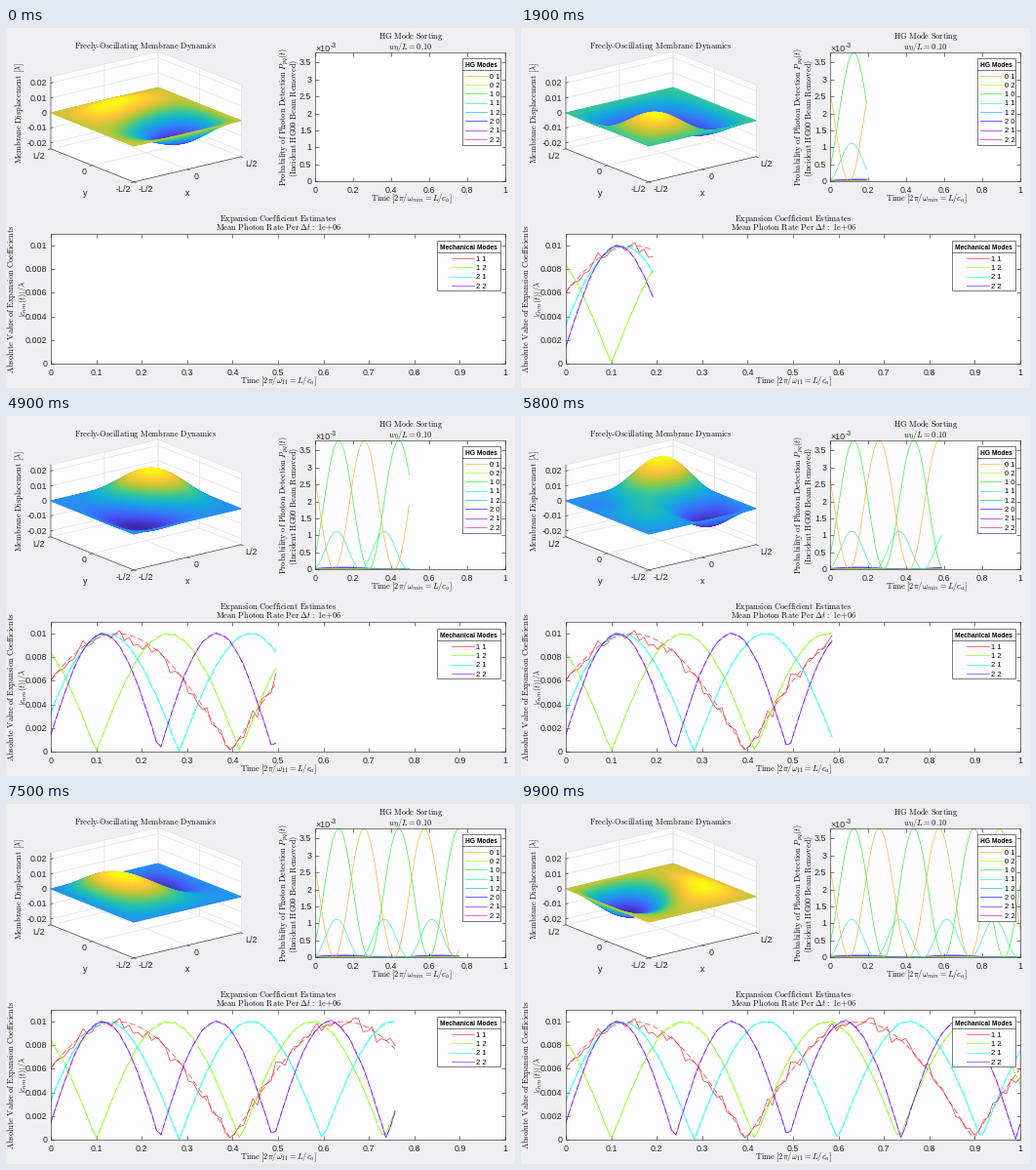
Write a matplotlib script that moves like this. It is 522x369 px and loops after 10000 ms.

```python
import numpy as np
import matplotlib.pyplot as plt
from matplotlib.animation import FuncAnimation
from matplotlib.colors import LinearSegmentedColormap

W, H, DPI = 522, 369, 100
STEPS = 100
PT = 72 / DPI
INK, GRID = "#262626", "#dfdee1"
PAPER, PANEL = "#efeef0", "#fdfcfe"
TICK, TEX, KEY = 8.9, 8.4, 6.7
THIN = .6 * PT

plt.rcParams["font.family"] = "Liberation Sans"
plt.rcParams["mathtext.fontset"] = "cm"

PARULA = LinearSegmentedColormap.from_list("parula", [
    (.2422, .1504, .6603), (.2810, .3228, .9579), (.1786, .5289, .9682),
    (.0689, .6948, .8394), (.2161, .7843, .5923), (.6720, .7793, .2227),
    (.9970, .7659, .2199), (.9769, .9839, .0805)])

HG_COLORS = {
    "0 1": (.95, .68, .1), "0 2": (.667, 1, 0), "1 0": (.1, .95, .15),
    "1 1": (.1, .95, .65), "1 2": (0, .667, 1), "2 0": (0, 0, 1),
    "2 1": (.5, 0, .95), "2 2": (1, 0, .667)}
MECH_COLORS = {"1 1": (.9, .12, .12), "1 2": (.5, 1, 0),
               "2 1": (0, 1, 1), "2 2": (.45, .05, .95)}

# Mode amplitudes of the free oscillation
time = np.linspace(0, 1, STEPS)
w12 = 2 * np.pi * np.sqrt(2.5)
coef = {
    "1 1": -np.cos(2 * np.pi * (time - .147)),
    "1 2": np.sin(w12 * (time - .1)),
    "2 1": -np.sin(w12 * (time - .282)),
    "2 2": -np.sin(4 * np.pi * (time - .239))}

rng = np.random.default_rng(7)
estimate = {}
for key, c in coef.items():
    spread = .04 if key == "1 1" else .007
    noise = rng.normal(0, spread, STEPS).clip(-2 * spread, 2 * spread)
    estimate[key] = np.abs(np.abs(c) + noise) * .01

power = {k: c ** 2 for k, c in coef.items()}
detect = {
    "0 1": 3.8 * power["1 2"], "0 2": .01 * power["1 1"],
    "1 0": 3.8 * power["2 1"], "1 1": 1.12 * power["2 2"],
    "1 2": .01 * power["2 1"], "2 0": .04 * power["1 1"],
    "2 1": .06 * power["1 1"], "2 2": .01 * power["2 2"]}

fig = plt.figure(figsize=(W / DPI, H / DPI), dpi=DPI, facecolor=PAPER)


def panel(x0, y0, x1, y1, ymax, xticks, yticks):
    ax = fig.add_axes([x0 / W, 1 - y1 / H, (x1 - x0) / W, (y1 - y0) / H],
                      facecolor=PANEL)
    ax.set(xlim=(0, 1), ylim=(0, ymax), xticks=xticks, yticks=yticks)
    ax.tick_params(direction="in", top=True, right=True, length=2.6,
                   width=THIN, color=INK, labelbottom=False, labelleft=False)
    for spine in ax.spines.values():
        spine.set(linewidth=THIN, color=INK)
    for v in xticks:
        text(x0 + v * (x1 - x0), y1 + 12, f"{v:.1g}")
    for v in yticks:
        text(x0 - 3.5, y1 - v / ymax * (y1 - y0) + 3, f"{v:g}", ha="right")
    return ax


stage = fig.add_axes([0, 0, 1, 1], zorder=5)
stage.set(xlim=(0, W), ylim=(H, 0))
stage.axis("off")


def text(x, y, s, size=TICK, ha="center", **kw):
    stage.text(x, y, s, fontsize=size * PT, ha=ha, va="baseline",
               color=kw.pop("color", INK), zorder=8, **kw)


def tex(x, y, s, upright=False):
    text(x, y, s, TEX, color="#111111", rotation=90 if upright else 0,
         rotation_mode="anchor")


def rm(s):
    """Upright words; text mode keeps hyphens and plus signs tight."""
    return "$" + r"\ ".join(r"\text{%s}" % word for word in s.split()) + "$"


def stroke(pts, color=INK, width=.6, z=1):
    xs, ys = zip(*pts)
    stage.plot(xs, ys, color=color, lw=width * PT, zorder=z)


def legend(x0, y0, x1, y1, title, colors, line_x, first):
    stage.add_patch(plt.Rectangle((x0, y0), x1 - x0, y1 - y0, fc=PANEL,
                                  ec=INK, lw=THIN, zorder=6))
    text((x0 + x1) / 2, y0 + 9, title, KEY, weight="bold", color="black")
    stroke([(x0, y0 + 12), (x1, y0 + 12)], z=7)
    for i, (name, color) in enumerate(colors.items()):
        y = first + 9.3 * i
        stroke([(line_x, y), (line_x + 22.5, y)], color, z=7)
        text(line_x + 25, y + 2.8, name, 7.6, ha="left", color="black")


def project(x, y, z):
    """Unit square plus height to stage pixels."""
    return 131 + 110 * x - 85 * y, 121 - 26 * x - 34 * y - 1535 * z


# Membrane box
LIM = .024
hull = [(0, 1, -LIM), (0, 0, -LIM), (1, 0, -LIM),
        (1, 0, LIM), (1, 1, LIM), (0, 1, LIM)]
stage.add_patch(plt.Polygon([project(*p) for p in hull], fc=PANEL, ec="none",
                            zorder=0))


def edge(*pts, **kw):
    stroke([project(*p) for p in pts], **kw)


for v in (.5, 1):
    edge((v, 0, -LIM), (v, 1, -LIM), (v, 1, LIM), color=GRID)
    edge((0, v, -LIM), (1, v, -LIM), (1, v, LIM), color=GRID)
edge((1, 0, -LIM), (1, 0, LIM), color=GRID)
edge((0, 1, LIM), (1, 1, LIM), (1, 0, LIM), color=GRID)
for z in np.arange(-2, 3) / 100:
    edge((0, 1, z), (1, 1, z), (1, 0, z), color=GRID)
    edge((0, 1, z), (.02, 1, z))
    text(42, project(0, 1, z)[1] + 3, f"{z:g}", ha="right")
edge((0, 1, LIM), (0, 1, -LIM), (0, 0, -LIM), (1, 0, -LIM))
for v in (0, .5, 1):
    edge((v, 0, -LIM), (v, -.025, -LIM))
    edge((0, v, -LIM), (-.025, v, -LIM))

for x, y, s in [(34, 134, "L/2"), (80, 150, "0"), (120, 168.5, "-L/2"),
                (143, 168.5, "-L/2"), (195, 155, "0"), (251, 142, "L/2"),
                (81, 171.5, "y"), (186, 172, "x")]:
    text(x, y, s)

# Titles and axis names
tex(143.5, 21, rm("Freely-Oscillating Membrane Dynamics"))
tex(16, 87.5, rm("Membrane Displacement") + r"$\ [\lambda]$", True)
tex(415, 11, rm("HG Mode Sorting"))
tex(415, 21.5, r"$w_0/L = 0.10$")
tex(288, 91, rm("Probability of Photon Detection") + r"$\ P_{pq}(t)$", True)
tex(298.5, 92, rm("(Incident HG00 Beam Removed)"), True)
tex(415.5, 177.5, rm("Time") + r"$\ [2\pi/\omega_{min} = L/c_a]$")
tex(279.5, 197.5, rm("Expansion Coefficient Estimates"))
tex(279.5, 207.5,
    rm("Mean Photon Rate Per") + r"$\ \Delta t:\ $" + rm("1e+06"))
tex(8.5, 277.5, rm("Absolute Value of Expansion Coefficients"), True)
tex(19.5, 278, r"$|c_{nm}(t)|/\lambda$", True)
tex(279.5, 364, rm("Time") + r"$\ [2\pi/\omega_{11} = L/c_a]$")
text(317.5, 24, "×10", ha="left")
text(333, 20.5, "-3", 6.8, ha="left")

hg_ax = panel(317, 25, 512, 157, 3.8, np.linspace(0, 1, 6), np.arange(0, 4, .5))
mech_ax = panel(46, 211, 512, 344, .011, np.linspace(0, 1, 11),
                np.arange(0, 11, 2) / 1000)
legend(468, 31, 507, 120, "HG Modes", HG_COLORS, 470.5, 48.7)
legend(441.5, 218, 507, 268.5, "Mechanical Modes", MECH_COLORS, 457, 236)

# Curves that grow with time
curves = []


def curve(ax, values, color, style="-"):
    line, = ax.plot([], [], style, color=color, lw=THIN)
    if style == "--":
        line.set_dashes((10, 5))
    curves.append((line, values))


for key, color in reversed(HG_COLORS.items()):
    curve(hg_ax, detect[key], color)
for key, color in MECH_COLORS.items():
    curve(mech_ax, estimate[key], color)
    curve(mech_ax, np.abs(coef[key]) * .01, color, "--")

# Grid runs from the far corner to the near one, so near cells cover far ones
axis = np.linspace(1, 0, 49)
gx, gy = np.meshgrid(axis, axis)
shapes = {f"{n} {m}": .01 * np.sin(n * np.pi * gx) * np.sin(m * np.pi * gy)
          for n in (1, 2) for m in (1, 2)}
surface = []


def update(k):
    while surface:
        surface.pop().remove()
    z = sum(coef[key][k] * shape for key, shape in shapes.items())
    px, py = project(gx, gy, z)
    surface.append(stage.pcolormesh(px, py, z, shading="gouraud", cmap=PARULA,
                                    zorder=3))
    for line, values in curves:
        line.set_data(time[:k + 1], values[:k + 1])
    return surface + [line for line, _ in curves]


anim = FuncAnimation(fig, update, frames=STEPS, interval=100, repeat=True,
                     repeat_delay=0, blit=False)
plt.show()
```
